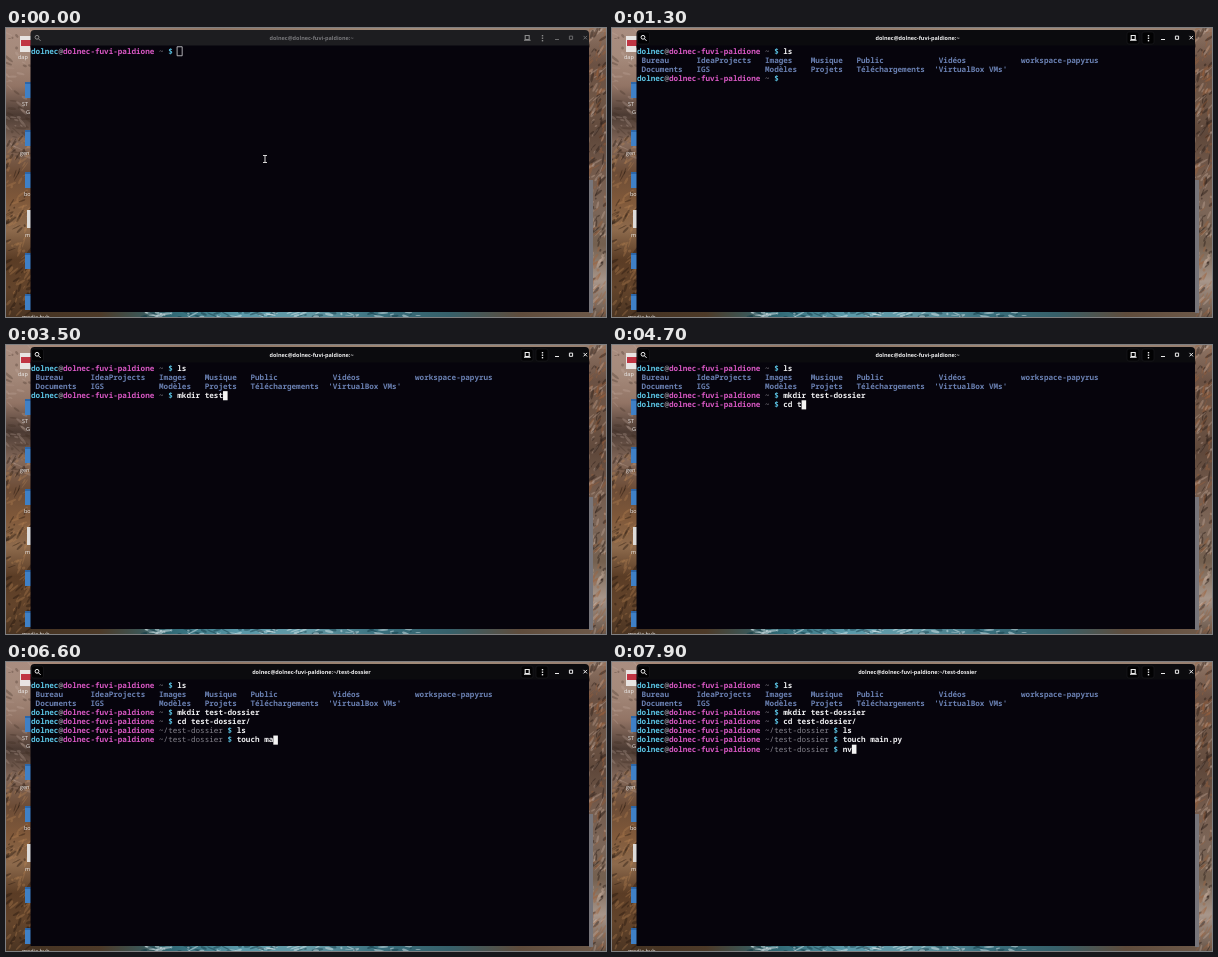
Write an HTML page with a canvas that moves like this. It is 600 by 289 pixels and loops after 8 s.

```html
<!DOCTYPE html>
<html lang="fr">
<head>
<meta charset="utf-8">
<title>Terminal</title>
<style>
html, body { margin: 0; height: 100%; overflow: hidden; background: #06040c; }
canvas { display: block; }
</style>
</head>
<body>
<canvas id="stage" width="600" height="289"></canvas>
<script>
const ctx = document.getElementById("stage").getContext("2d");
const LOOP = 8000, FOCUS = 300, BLINK = 300;
const LEFT = 25, TOP = 18.75, CELL = 4.572, LINE = 9.13;
const USER = "dolnec", HOST = "dolnec-fuvi-paldione";
const CYAN = "#5cc6e6", PINK = "#d958c4", GREY = "#85838c", BLUE = "#6a80b2", WHITE = "#eeeef0";

// Typing runs: start time, time per key, keys (\b erases, \t completes, \n runs)
const RUNS = [
  [600, 200, "ls\n"],
  [2100, 100, "mkj\bdir "],
  [3200, 100, "test"],
  [3600, 72, "-dossier\ncd "],
  [4700, 100, "te\t\nls\n"],
  [5900, 100, "touc"],
  [6350, 50, "h "],
  [6550, 50, "ma"],
  [6700, 120, "in.py"],
  [7500, 200, "\nnv"]
];
const KEYS = RUNS.flatMap(([start, step, keys]) => [...keys].map((key, i) => [start + i * step, key]));

// Directory listing: column, first row, second row
const LISTING = [
  [1, "Bureau", "Documents"], [13, "IdeaProjects", "IGS"], [28, "Images", "Modèles"],
  [38, "Musique", "Projets"], [48, "Public", "Téléchargements"],
  [66, "Vidéos", ""], [65, "", "'VirtualBox VMs'"], [84, "workspace-papyrus", ""]
];

function rect(x, y, w, h, color) {
  ctx.fillStyle = color;
  ctx.fillRect(x, y, w, h);
}

function path(color, width, build) {
  ctx.strokeStyle = color;
  ctx.lineWidth = width;
  ctx.beginPath();
  build();
  ctx.stroke();
}

function label(str, x, y, color, font, align = "left") {
  ctx.font = font;
  ctx.fillStyle = color;
  ctx.textAlign = align;
  ctx.fillText(str, x, y);
}

function cells(str, col, row, color, weight = 700) {
  label(str, LEFT + col * CELL, TOP + row * LINE + 6.9, color, weight + ' 7.62px "Noto Sans Mono", monospace');
}

function fade(x, y, w, h, vertical, colors) {
  const g = ctx.createLinearGradient(x, y, vertical ? x : x + w, vertical ? y + h : y);
  colors.forEach((c, i) => g.addColorStop(i / (colors.length - 1), c));
  rect(x, y, w, h, g);
}

// Thin cracks and ridges, slanted around the given angle
function rocks(rand, count, x, y, w, h, angle, colors) {
  for (let i = 0; i < count; i++) {
    ctx.fillStyle = colors[Math.floor(rand() * colors.length)];
    ctx.beginPath();
    ctx.ellipse(x + rand() * w, y + rand() * h, 1 + rand() * 5, 0.4 + rand() * 1.1, angle + rand() - 0.5, 0, 7);
    ctx.fill();
  }
}

function desktop() {
  let seed = 7;
  const rand = () => (seed = seed * 16807 % 2147483647) / 2147483647;
  fade(0, 0, 300, 289, true, ["#a98d80", "#a58a7b", "#927465", "#4c3b33", "#84695a", "#6c4c36", "#80593a", "#8d6a4c", "#5a3c25", "#63442b", "#4a3422"]);
  fade(300, 0, 300, 289, true, ["#8f7565", "#6b5143", "#6f5646", "#5f483b", "#745b4c", "#7c6658", "#74604f", "#a8968a", "#685548"]);
  fade(24, 0, 576, 4, false, ["#a88a7a", "#8e7564", "#a08a78", "#957d6e"]);
  rocks(rand, 60, 0, 0, 26, 130, 0.4, ["rgba(60,42,34,.3)", "rgba(205,180,168,.25)"]);
  rocks(rand, 140, 0, 110, 26, 179, -0.8, ["rgba(32,20,12,.4)", "rgba(190,135,85,.3)"]);
  rocks(rand, 260, 582, 0, 18, 289, -1, ["rgba(35,24,20,.42)", "rgba(215,190,172,.3)", "rgba(160,98,58,.35)"]);
  fade(24, 283, 560, 6, false, ["#453322", "#4d3a28", "#2f6874", "#5a9aaa", "#6298a4", "#386f7d", "#36606a", "#5f4c3c", "#6c5848"]);
  rocks(rand, 70, 135, 284, 280, 5, 0, ["rgba(215,232,235,.5)", "rgba(20,60,72,.5)"]);
  rect(583, 152, 4, 133, "#77757a");

  rect(14, 8, 12, 16, "#e8e4e2");
  rect(15, 12, 11, 6, "#c03543");
  for (const y of [54, 102, 144, 225, 266]) {
    rect(19, y, 6, 3, "#2c66a8");
    rect(19, y + 2, 6, 14, "#3f80c6");
  }
  rect(21, 182, 5, 18, "#dedcda");
  const small = '5.5px "Open Sans", sans-serif';
  [["dap", 12, 31], ["ST", 16, 78], ["G", 20, 86], ["gen", 14, 127], ["bo", 18, 168], ["m", 19, 209], ["media.hub", 16, 290.5]]
    .forEach(([str, x, y]) => label(str, x, y, "#eee", small));
}

function frame(focused, title) {
  const ink = focused ? "#eeeeee" : "#8b8b8b";
  const dim = focused ? "#eeeeee" : "#6a6a6c";
  ctx.fillStyle = focused ? "#0b0b0e" : "#1d1d20";
  ctx.beginPath();
  ctx.roundRect(24.5, 2, 558.5, 20, 4);
  ctx.fill();
  rect(24.5, 17.5, 558.5, 266.5, "#06040c");
  label(title, 305.5, 12, focused ? "#eeeeee" : "#77777a", '700 5.5px "Open Sans", sans-serif', "center");

  if (focused) {
    for (const x of [25.5, 515, 530]) {
      ctx.fillStyle = "#020203";
      ctx.beginPath();
      ctx.roundRect(x, 4, 12, 12, 2);
      ctx.fill();
      path("#1d1d20", 0.6, () => ctx.roundRect(x, 4, 12, 12, 2));
    }
  }
  path(ink, 1, () => {
    ctx.arc(31, 9.3, 1.9, 0, 7);
    ctx.moveTo(32.4, 10.7);
    ctx.lineTo(34.6, 12.9);
  });
  path(ink, 1.1, () => {
    ctx.rect(519.2, 7.5, 4, 4);
    ctx.moveTo(518, 12.2);
    ctx.lineTo(524.6, 12.2);
  });
  for (const y of [7, 9.5, 12]) rect(535.8, y, 1.4, 1.4, ink);
  rect(549, 11, 4, 1, dim);
  path(dim, 1, () => ctx.rect(563.4, 8.1, 3.2, 3.2));
  path(dim, 1, () => {
    ctx.moveTo(577.5, 7.9);
    ctx.lineTo(581, 11.4);
    ctx.moveTo(581, 7.9);
    ctx.lineTo(577.5, 11.4);
  });
}

function prompt(row, dir) {
  cells(USER, 0, row, CYAN);
  cells("@", 6, row, GREY);
  cells(HOST, 7, row, PINK);
  cells(dir, 28, row, GREY, 500);
  cells("$", 29 + dir.length, row, CYAN);
  return 31 + dir.length;
}

function mouse(x, y) {
  path("#d8d8d8", 1, () => {
    ctx.moveTo(x - 2, y - 3.5);
    ctx.lineTo(x + 2, y - 3.5);
    ctx.moveTo(x, y - 3.5);
    ctx.lineTo(x, y + 3.5);
    ctx.moveTo(x - 2, y + 3.5);
    ctx.lineTo(x + 2, y + 3.5);
  });
}

// Replays the keys up to time t
function session(t) {
  const lines = [{ dir: "~", text: "", row: 0 }];
  let last = FOCUS;
  for (const [time, key] of KEYS) {
    if (time > t) break;
    last = time;
    const line = lines[lines.length - 1];
    if (key === "\b") line.text = line.text.slice(0, -1);
    else if (key === "\t") line.text = "cd test-dossier/";
    else if (key === "\n") {
      line.listed = line.text === "ls" && line.dir === "~";
      const dir = line.text.startsWith("cd ") ? "~/test-dossier" : line.dir;
      lines.push({ dir, text: "", row: line.row + (line.listed ? 3 : 1) });
    } else line.text += key;
  }
  return { lines, last };
}

function draw(now) {
  const t = Math.floor(now % LOOP / 100) * 100;
  const focused = t >= FOCUS;
  const { lines, last } = session(t);
  const current = lines[lines.length - 1];

  ctx.textRendering = "geometricPrecision";
  desktop();
  frame(focused, `${USER}@${HOST}:${current.dir}`);

  let col = 0;
  for (const { dir, text, row, listed } of lines) {
    const start = prompt(row, dir);
    cells(text, start, row, WHITE, 600);
    col = start + text.length;
    if (listed) for (const [c, a, b] of LISTING) {
      cells(a, c, row + 1, BLUE);
      cells(b, c, row + 2, BLUE);
    }
  }

  const x = LEFT + col * CELL, y = TOP + current.row * LINE;
  if (!focused) path("#d6d6d8", 0.8, () => ctx.rect(x - 0.2, y, CELL + 0.5, 9));
  else if ((t - last) % (2 * BLINK) < BLINK) rect(x, y, CELL, LINE, "#f4f4f4");
  if (t < KEYS[0][0]) mouse(259, 131);
}

function tick() {
  draw(performance.now());
  requestAnimationFrame(tick);
}
tick();
</script>
</body>
</html>
```
